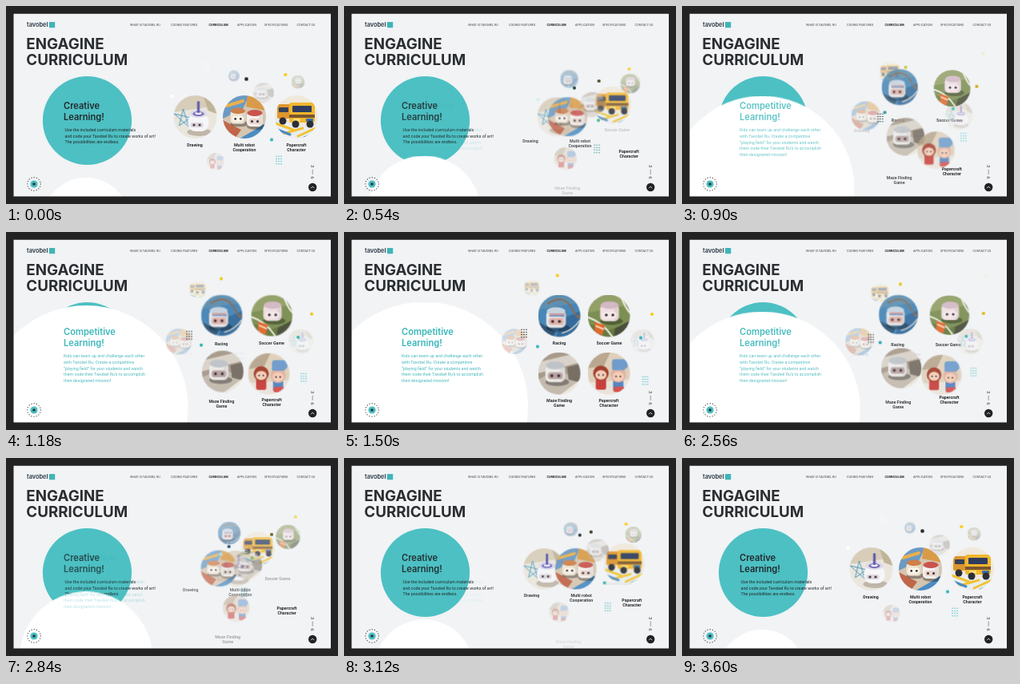
Animation of 415x248 px, one loop 3640 ms. Source, as an HTML page:

```html
<!DOCTYPE html>
<html lang="en">
<head>
<meta charset="utf-8">
<title>Engagine Curriculum</title>
<style>
  html, body { margin: 0; width: 100%; height: 100%; overflow: hidden; background: #232324; }
  svg { display: block; width: 415px; height: 248px; font-family: Roboto, sans-serif; }

  .move { animation: swap 3640ms ease infinite; }
  @keyframes swap {
    0%, 10.05%, 96.7%, 100% { transform: var(--a); opacity: var(--oa); color: var(--ca); }
    39.4%, 67.4% { transform: var(--b); opacity: var(--ob); color: var(--cb); }
  }

  .nav { font-size: 3.85px; fill: #45484b; }
  .nav .on { font-weight: 700; fill: #1d1f21; }
  .head { font: 700 18.75px Inter, sans-serif; fill: #2b2e31; }
  .title { font: 600 11.1px Inter, sans-serif; }
  .copy { font-size: 5.3px; }
  .label { font-size: 5.3px; font-weight: 700; fill: #26282a; text-anchor: middle; }
  .side { font-size: 6px; fill: #3a3d40; text-anchor: middle; }
</style>
</head>
<body>
<svg id="stage" viewBox="0 0 415 248" xmlns="http://www.w3.org/2000/svg"></svg>
<script>
const TEAL = '#4dc0c3', DARK = '#26292c', YELLOW = '#f9cb14';

// Shape helpers
const circle = (x, y, r, fill, more = '') => `<circle cx="${x}" cy="${y}" r="${r}" fill="${fill}" ${more}/>`;
const oval = (x, y, rx, ry, fill) => `<ellipse cx="${x}" cy="${y}" rx="${rx}" ry="${ry}" fill="${fill}"/>`;
const rect = (x, y, w, h, fill, r = 0) => `<rect x="${x}" y="${y}" width="${w}" height="${h}" rx="${r}" fill="${fill}"/>`;
const shape = (d, fill) => `<path d="${d}" fill="${fill}"/>`;
const line = (d, color, w = 1) => `<path d="${d}" fill="none" stroke="${color}" stroke-width="${w}" stroke-linecap="round"/>`;
const text = (x, y, s, cls = '', more = '') => `<text x="${x}" y="${y}" class="${cls}" ${more}>${s}</text>`;
const lines = (x, y, step, cls, fill, rows) =>
  rows.map((s, i) => text(x, y + i * step, s, cls, `fill="${fill}"`)).join('');
const place = (x, y, k, body) => `<g transform="translate(${x} ${y}) scale(${k})">${body}</g>`;

// Pose: x, y, scale, opacity, colour
const pose = (k, [x, y, s = 1, o = 1, c = DARK]) =>
  `--${k}:translate(${x}px,${y}px) scale(${s});--o${k}:${o};--c${k}:${c};`;
const move = (a, b, body) => `<g class="move" style="${pose('a', a)}${pose('b', b)}">${body}</g>`;

// Pictures, drawn in a disc of radius 27
const eyes = (x, y) => circle(x - 3.5, y, 1.5, '#3b2f38') + circle(x + 3.5, y, 1.5, '#3b2f38');
const robot = (x, y, k, body, cap, face) => place(x, y, k,
  oval(2, 9, 12, 4, '#0005') + rect(-10, -9, 20, 18, body, 5) + rect(5, -7, 5, 15, '#0001', 3) +
  oval(0, -8, 9.5, 4, cap) + rect(-7.5, -1, 15, 7, face, 3) + eyes(0, 2.5));
const doll = (x, y, hair, dress) => place(x, y, 1.1,
  rect(-6, 5, 12, 13, dress, 2) + circle(0, -1, 9, hair) + oval(0, 1, 6.5, 5.5, '#f5cdb7') +
  circle(-2.5, 1, 1, '#3b2f38') + circle(2.5, 1, 1, '#3b2f38'));

const pictures = {
  drawing: rect(-27, -27, 54, 54, '#d8cdb9') + shape('M-27-6L27-14V27H-27Z', '#ebe6dc') +
    shape('M10-27H27V-4L16-8Z', '#bfb497') +
    line('M-26-4L-6 1L-20 11L-15-10L-8 12Z', '#4a9cc2', 1) +
    oval(5, 19, 15, 5, '#bfb6a8') + rect(-9, -4, 26, 22, '#f6f5f8', 9) +
    oval(4, -4, 11, 5, '#dcd9ea') + oval(4, -4, 7, 3, '#6a63b4') + oval(4, -4.5, 4.5, 1.8, '#ece9f4') +
    rect(2.5, -20, 3, 15, '#5a55a8', 1.5) + rect(-6, 7, 16, 6, '#dcd5dc', 3) + eyes(2, 10),
  multi: rect(-27, -27, 54, 54, '#d5c5b0') + shape('M-27-27H6L-2-10L-27 2Z', '#6c9ac3') +
    shape('M4-27H27V-8L2-13Z', '#d99b48') + shape('M-6 27L27 8V27Z', '#4b8cc4') +
    shape('M-27 4L-4 16L-12 27H-27Z', '#c0664b') + line('M-22-14L-2-20', '#e9b04e', 4) +
    robot(-8, 0, .95, '#efe5d3', '#cf7f4a', '#fbf6ec') + robot(13, 3, 1, '#f4f1ee', '#c9544d', '#e9d5cb'),
  truck: rect(-27, -27, 54, 54, '#f0e8da') + shape('M-27 2L6 12L27 10V27H-27Z', '#e9edf0') +
    line('M-26 8L-4 16M-20 22L8 14M2 24L24 14', '#f0c332', 3) + line('M-26 15L-8 22M10 26L26 20', '#4a8bc6', 3) +
    rect(-24, -16, 18, 18, '#dd962f', 2) + rect(-22, -12, 12, 6, '#34405c', 1) +
    rect(-9, -18, 32, 25, '#f1b62c', 3) + rect(-5, -14, 24, 8, '#2e3c60', 1) +
    rect(-9, -3, 32, 4, '#7b5530') + rect(-4, 2, 9, 4, '#f8dc78', 1) + rect(12, 2, 9, 4, '#3a6fae', 1) +
    circle(-17, 5, 4.5, '#2d2f36') + circle(-1, 9, 4.5, '#2d2f36') + circle(17, 9, 4.5, '#2d2f36'),
  racing: rect(-27, -27, 54, 54, '#4886b6') + shape('M-27-27H27V-17L-27-8Z', '#5e8fb0') +
    shape('M4 4L27-6V27H-4Z', '#356b9c') + shape('M-27 8L-4 20L-8 27H-27Z', '#2f5576') +
    line('M4 22Q18 18 26 6', '#e5ded2', 1.5) + line('M-14-16Q6-28 16-10T25 0', '#8a6a50', 2) +
    robot(-4, 4, 1.25, '#e6e5e6', '#c5d3df', '#dfb1a9') + line('M-12-2H6', '#d07f74', 1.4) + line('M-12 0H6', '#4f79b5', 1.4),
  soccer: rect(-27, -27, 54, 54, '#7c8f52') + shape('M-27-27H27V-14L-27-4Z', '#93a067') +
    shape('M-27 10L0 18L27 8V27H-27Z', '#66793f') + shape('M8 16L27 6V27H6Z', '#4a4f3a') +
    line('M-26 2Q-8 8 4 26M16-24Q22-8 27-4', '#f0eee4', 2.2) + shape('M-18 8L-5 12L-8 25L-18 22Z', '#e0692f') +
    line('M-16 13L-7 17', '#f6d9b8', 2) + robot(1, -4, 1.2, '#f0dfe2', '#d3b9c6', '#f6e9ea'),
  maze: rect(-27, -27, 54, 54, '#a89b8b') + shape('M-27-14L27-27V-14L-27 0Z', '#d9d2c8') +
    shape('M-27 8L-2-4L27 8V27H-27Z', '#c4bbae') + shape('M10-8L27-12V12L12 8Z', '#776e64') +
    shape('M2 27L27 8V27Z', '#ece6dc') + robot(-5, 0, 1.25, '#eceae8', '#bfc3c8', '#b8a2a0'),
  dolls: rect(-27, -27, 54, 54, '#dfd0bb') + shape('M-27 12L27 8V27H-27Z', '#e9e3da') +
    shape('M-27-27H2L-6-10L-27-6Z', '#b9a78f') + rect(4, -18, 20, 12, '#6f9ccc', 4) +
    doll(-10, 1, '#a3412f', '#c8403c') + doll(12, 3, '#e0b3a2', '#5585c2') +
    rect(4, -9, 17, 5, '#6f9ccc', 2) + rect(6, 17, 14, 7, '#d5524f', 2),
};
const photo = (name, a, b) => {
  const fit = ([x, y, r, o]) => [x, y, r / 27, o];
  return move(fit(a), fit(b), `<g clip-path="url(#disc)">${pictures[name]}</g>`);
};

const label = (rows, a, b) => move(a, b, lines(0, 0, 6, 'label', DARK, rows));
const dot = (a, b) => move(a, b, circle(0, 0, 2.1, 'currentColor'));
const grid = (a, b) => {
  let s = '';
  for (let i = 0; i < 12; i++) s += circle((i % 3 - 1) * 3, (Math.floor(i / 3) - 1.5) * 3.1, .75, 'currentColor');
  return move(a, b, s);
};

const left =
  circle(101.5, 143.5, 55.6, TEAL) +
  lines(72, 128.6, 14, 'title', '#22282b', ['Creative', 'Learning!']) +
  lines(73.5, 157.2, 7.5, 'copy', '#22282b', [
    'Use the included curriculum materials',
    'and code your Tavobel Ru to create works of art!',
    'The possibilities are endless.']) +
  move([100, 270, .424], [100, 217.5, 1], circle(0, 0, 130, '#fff')) +
  move([0, 0, 1, 0], [0, 0],
    lines(72, 128.6, 14, 'title', '#36b5b9', ['Competitive', 'Learning!']) +
    lines(72, 157.4, 7.65, 'copy', '#45b7bb', [
      'Kids can team up and challenge each other',
      'with Tavobel Ru. Create a competitive',
      '“playing field” for your students and watch',
      'them code their Tavobel Ru’s to accomplish',
      'their designated mission!']));

const labels =
  label(['Drawing'], [236, 176], [222, 153, 1, 0]) +
  label(['Multi robot', 'Cooperation'], [298, 176], [284, 153, 1, 0]) +
  label(['Papercraft', 'Character'], [363, 176], [331, 213]) +
  label(['Racing'], [274, 161, 1, 0], [269, 141]) +
  label(['Soccer Game'], [344, 161, 1, 0], [331.5, 140.7]) +
  label(['Maze Finding', 'Game'], [282, 234, 1, 0], [269, 213.4]);

const photos =
  photo('drawing', [236.5, 139, 27, 1], [373, 137, 15, .3]) +
  photo('multi', [298, 139, 27, 1], [213, 137, 16, .3]) +
  photo('truck', [363, 139, 27, 1], [235, 69.5, 10.5, .3]) +
  photo('racing', [285, 87.5, 7, .3], [269, 105, 26.5, 1]) +
  photo('soccer', [365, 95, 8.5, .3], [331, 105, 26.5, 1]) +
  photo('maze', [322, 109, 13, .3], [269, 177, 26.5, 1]) +
  photo('dolls', [262, 195, 11, .3], [331, 177, 26.5, 1]);

const confetti =
  dot([300.5, 91.5, 1, 1, DARK], [242, 143.5, 1, 1, '#2fb5b8']) +
  dot([300.5, 91.5, 1, 1, DARK], [385, 103, 1, 1, YELLOW]) +
  dot([332, 167.5, 1, 1, '#2fb5b8'], [266.7, 54.5, 1, 1, YELLOW]) +
  dot([349.3, 86, 1, 1, YELLOW], [383, 53, 1, 0, YELLOW]) +
  dot([207.5, 113, 1, 1, '#ffffff'], [371, 132.5, 1, 1, '#2fb5b8']) +
  grid([341, 193, 1, 1, '#4dc0c3'], [225, 127, 1, 1, DARK]) +
  grid([251, 75.5, 1, 1, '#ffffff'], [376.5, 186, 1, 1, '#4dc0c3']);

const menu = [[155, 'WHAT IS TAVOBEL RU'], [206, 'CODING FEATURES'], [253.5, 'CURRICULUM', 'on'],
  [289, 'APPLICATION'], [323, 'SPECIFICATIONS'], [363.5, 'CONTACT US']];

const chrome =
  text(26, 26.3, 'tavobel', '', 'font-family="Inter, sans-serif" font-weight="600" font-size="7.4" fill="#2b3945"') +
  rect(54, 20, 7.2, 7.2, '#3fb5b9') +
  `<g class="nav">${menu.map(([x, s, c]) => text(x, 24.8, s, c)).join('')}</g>` +
  lines(25.3, 54.4, 19.1, 'head', DARK, ['ENGAGINE', 'CURRICULUM']) +
  circle(35, 223, 8.3, 'none', 'stroke="#3d4245" stroke-width="1.3" stroke-linecap="round" stroke-dasharray="0 3.26"') +
  circle(35, 223, 4.6, TEAL) + rect(33.4, 221.4, 3.2, 3.2, '#24323a', .6) +
  text(0, 0, '3', 'side', 'transform="translate(381.2 200.8) rotate(90)"') +
  line('M383.2 205V210.5', '#5a5d60', .6) +
  text(0, 0, '6', 'side', 'transform="translate(381.2 215) rotate(90)"') +
  circle(383.2, 227, 5.2, '#202224') + line('M381.4 227.9L383.2 226.1L385 227.9', '#fff', .8);

document.getElementById('stage').innerHTML =
  '<defs><clipPath id="disc"><circle r="27"/></clipPath></defs>' +
  rect(9, 9, 398, 231, '#f1f3f5') + left + labels + photos + confetti + chrome +
  '<path d="M0 0H415V248H0ZM9.5 9.7V238.5H406V9.7Z" fill="#232324" fill-rule="evenodd"/>';
</script>
</body>
</html>
```
